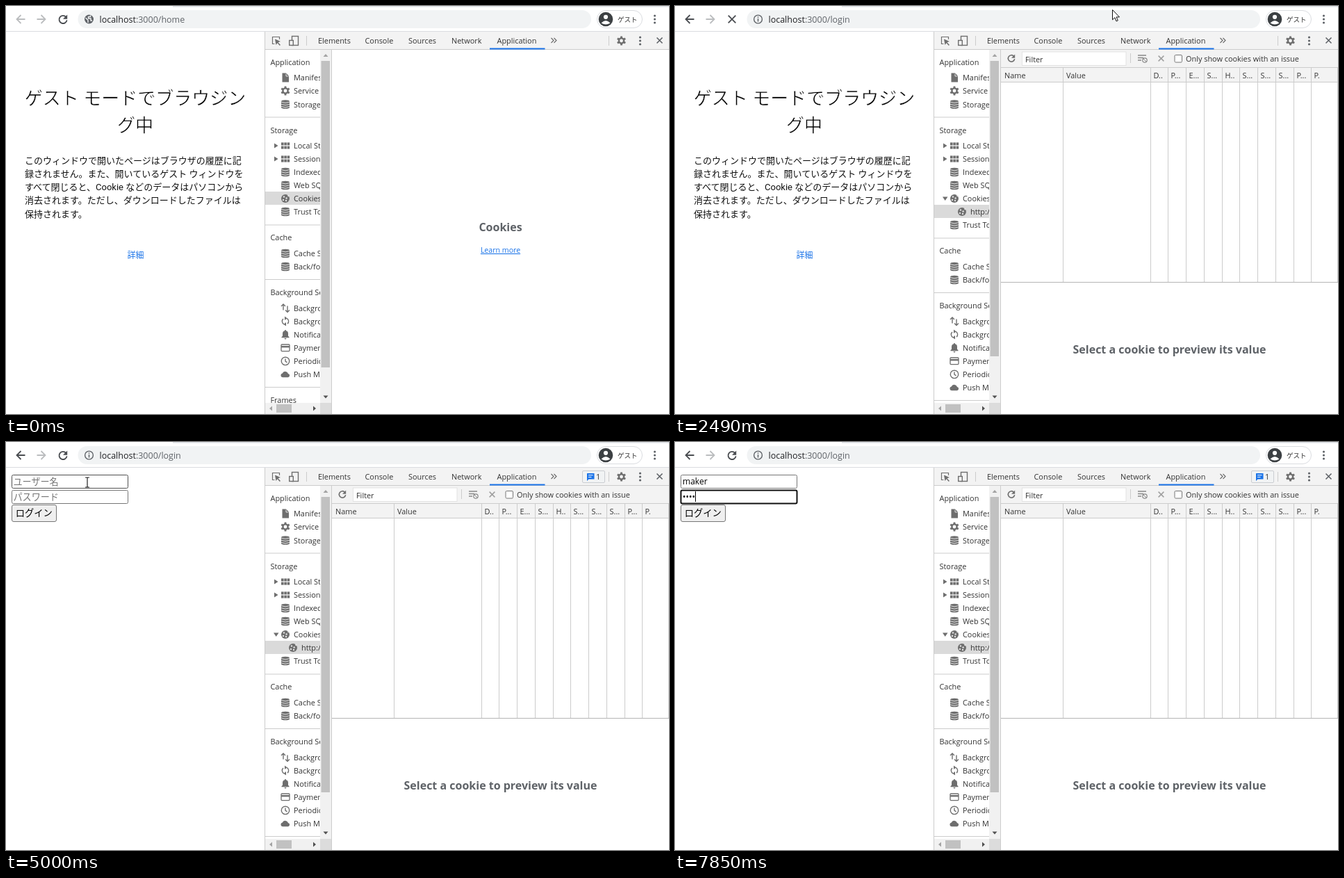
An HTML page for the animation above (8 s loop, 954x587 px).

```html
<!DOCTYPE html>
<html lang="ja">
<head>
<meta charset="utf-8">
<title>Login cookies</title>
<style>
html, body { margin: 0; width: 100%; height: 100%; overflow: hidden; background: #fff; }
svg { display: block; width: 954px; height: 587px; }
text { font-family: "Open Sans", "Noto Sans", "Noto Sans CJK JP", sans-serif; font-size: 10.9px; fill: #333; white-space: pre; }
.jp { font-family: Roboto, "Noto Sans CJK JP", "Noto Sans CJK", sans-serif; }
.title { font-size: 26px; font-weight: 300; fill: #000; stroke: #fff; stroke-width: .6; }
.body { font-size: 13px; fill: #111; }
.big { font-size: 16px; font-weight: 700; fill: #5f6368; }
.line { fill: none; stroke: #6e6e6e; stroke-width: 1.4; }
.rule { stroke: #ccc; stroke-width: 1; fill: none; }
</style>
</head>
<body>
<svg id="stage" viewBox="0 0 954 587" xmlns="http://www.w3.org/2000/svg"></svg>
<script>
const GREY = '#6e6e6e', DARK = '#5f6368', BLUE = '#1a73e8', PANEL = '#f3f3f3';

const text = (x, y, s, attrs = '') => `<text x="${x}" y="${y}" ${attrs}>${s}</text>`;
const rect = (x, y, w, h, fill, attrs = '') =>
  `<rect x="${x}" y="${y}" width="${w}" height="${h}" fill="${fill}" ${attrs}/>`;
const path = (d, attrs = 'class="line"') => `<path d="${d}" ${attrs}/>`;
const fill = c => `fill="${c}"`;
const stroke = (c, w = 1.5) => `fill="none" stroke="${c}" stroke-width="${w}"`;
const circle = (x, y, r, attrs) => `<circle cx="${x}" cy="${y}" r="${r}" ${attrs}/>`;
const group = (id, body, attrs = '') => `<g id="${id}" ${attrs}>${body}</g>`;
const at = (x, y, body) => `<g transform="translate(${x} ${y})">${body}</g>`;
const hline = (y, x1, x2, attrs = 'class="rule"') => path(`M${x1} ${y}H${x2}`, attrs);
const vline = (x, y1, y2, attrs = 'class="rule"') => path(`M${x} ${y1}V${y2}`, attrs);
const dots = (x, y) => [-5, 0, 5].map(d => circle(x, y + d, 1.6, fill(DARK))).join('');
const cross = (x, y, r, c, w) => at(x, y, path(`M${-r} ${-r}L${r} ${r}M${r} ${-r}L${-r} ${r}`, stroke(c, w)));
const reload = (x, y, r, c, w) => at(x, y,
  path(`M${r * .75} ${-r * .6}A${r} ${r} 0 1 0 ${r} ${r * .25}`, stroke(c, w)) +
  path(`M${r * 1.1} ${-r * 1.15}V${-r * .05}H0Z`, fill(c)));
const arrow = (x, dir, c) => at(x, 19,
  path(`M${6.5 * dir} 0H${-5.5 * dir}M${.5 * dir} -6L${-5.5 * dir} 0L${.5 * dir} 6`, stroke(c, 1.8)));

const icons = {
  file: path('M-4.5-6.5H1L5-2.5V6.5H-4.5Z', fill(GREY)) + path('M1-5.5V-2H4.5', stroke('#fff', .8)),
  gear: circle(0, 0, 3.6, stroke(GREY, 2.4)) +
    [0, 60, 120].map(a => path('M0-6.6V-4M0 4V6.6', `transform="rotate(${a})" ${stroke(GREY, 2.8)}`)).join(''),
  disks: path('M-6-4.2Q-6-6.3 0-6.3Q6-6.3 6-4.2V4.2Q6 6.3 0 6.3Q-6 6.3-6 4.2Z', fill(GREY)) +
    [-3.4, -.2, 3].map(y => path(`M-6 ${y}Q0 ${y + 2.6} 6 ${y}`, stroke('#fff', .8))).join(''),
  grid: [-6, -1.7, 2.6].map(x => rect(x, -4.6, 3.6, 4, GREY) + rect(x, .6, 3.6, 4, GREY)).join(''),
  cookie: circle(0, 0, 6, fill(GREY)) +
    [[-2, -2.5], [-3, 2], [1, 3], [1.6, -.5], [4.4, -4]].map(([x, y]) => circle(x, y, 1.2, fill('#e4e4e4'))).join(''),
  updown: path('M-3 3V-5M-6-2.5L-3-5.5L0-2.5M3-3V5.5M0 3L3 6L6 3'),
  sync: path('M-2 4.2A4.6 4.6 0 0 1-3-3.5M2-4.2A4.6 4.6 0 0 1 3 3.5') +
    path('M-1-7V-1.5L2.5-4.3ZM1 7V1.5L-2.5 4.3Z', fill(GREY)),
  bell: path('M-5.5 4.5V3.5L-4 2V-1.5Q-4-5-1-5.5V-6.5H1V-5.5Q4-5 4-1.5V2L5.5 3.5V4.5ZM-1.5 5.2H1.5Q1 6.8 0 6.8Q-1 6.8-1.5 5.2Z', fill(GREY)),
  card: rect(-6, -4.8, 12, 9.6, 'none', 'rx="1" stroke="#6e6e6e" stroke-width="1.3"') + rect(-6, -2.8, 12, 2.4, GREY),
  clock: circle(0, 0, 5.7, 'class="line"') + path('M0-3.5V.3L2.5 2'),
  cloud: path('M-4 4.3A3 3 0 0 1-4.3-1.6A4.4 4.4 0 0 1 3.9-1A2.7 2.7 0 0 1 4 4.3Z', fill(GREY)),
};
const icon = (name, x, y) => at(x, y, icons[name]);
const item = (y, name, label, dx = 0, c = '#333') => icon(name, 402 + dx, y) + text(414 + dx, y + 4, label, fill(c));
const heading = (y, label) => text(380.5, y + 4, label);
const items = rows => rows.map(r => item(...r)).join('');
const triangle = y => path(`M386 ${y - 3.5}L391.5 ${y}L386 ${y + 3.5}Z`, fill(GREY));

function browserBar() {
  return rect(0, 0, 954, 37, '#fff') + rect(240, 0, 714, 1.5, '#dee1e6') + hline(36.5, 0, 954, stroke('#dadce0', 1)) +
    group('backOff', arrow(21, 1, '#bbbdbf')) + group('backOn', arrow(21, 1, '#4a4d51')) + arrow(51, -1, '#bbbdbf') +
    group('reload', reload(82, 19, 5.6, '#4a4d51', 1.9)) + group('stop', cross(82, 19, 5.3, '#4a4d51', 1.8)) +
    group('pill', rect(103.5, 6, 738.5, 26, '#f1f3f4', 'rx="13"')) +
    group('pillFocus', rect(103, 6, 739, 26, '#fff', `rx="13" stroke="${BLUE}" stroke-width="2"`)) +
    group('globe', circle(119.5, 19, 6.5, fill(DARK)) +
      path('M114.5 17L118 20.5V24M121.5 13.5V15.5H118.5V18H122V21H124', stroke('#f1f3f4', 1.4))) +
    group('info', circle(119.5, 19, 5.9, stroke(DARK, 1.4)) + path('M119.5 18V22.5M119.5 15.3V16.8', stroke(DARK, 1.5))) +
    `<text id="url" x="134.5" y="23.5" style="font-size:12.5px"><tspan fill="#202124">localhost</tspan><tspan fill="#5f6368" id="urlPath"></tspan></text>` +
    group('urlCaret', rect(258, 10, 1, 17, '#000')) +
    rect(850.5, 6.5, 65, 25, '#fff', 'rx="12.5" stroke="#dadce0"') +
    circle(863, 19, 10.3, fill('#3c4043')) + circle(863, 15.8, 3.1, fill('#fff')) +
    path('M856.5 24.5Q863 17.5 869.5 24.5Q863 28.5 856.5 24.5Z', fill('#fff')) +
    text(880, 23, 'ゲスト', 'class="jp" style="font-size:9.5px"') + dots(933.5, 19);
}

function guestPage() {
  const lines = ['このウィンドウで開いたページはブラウザの履歴に記', '録されません。また、開いているゲスト ウィンドウを',
    'すべて閉じると、Cookie などのデータはパソコンから', '消去されます。ただし、ダウンロードしたファイルは', '保持されます。'];
  const title = 'class="jp title" text-anchor="middle"';
  return text(186, 141.5, 'ゲスト モードでブラウジン', title) + text(186, 180.5, 'グ中', title) +
    lines.map((s, i) => text(27, 226.5 + 19.3 * i, s, 'class="jp body"')).join('') +
    text(186.5, 362.5, '詳細', `class="jp" text-anchor="middle" style="font-size:12px;fill:${BLUE}"`);
}

function loginPage() {
  const field = (id, y, hint) =>
    `<rect id="${id}Box" x="8.5" y="${y}.5" width="167" height="19" rx="2" fill="#fff"/>` +
    text(10.5, y + 14.5, hint, `id="${id}Hint" class="jp" style="font-size:13.1px;fill:#757575"`) +
    text(11, y + 14, '', `id="${id}Text" style="font-size:12px;fill:#000"`) +
    rect(11, y + 2, 1, 15, '#000', `id="${id}Caret"`);
  return field('user', 47, 'ユーザー名') + field('pass', 69, 'パスワード') +
    rect(8.5, 90.5, 64, 24, '#efefef', 'rx="2.5" stroke="#767676"') +
    text(40.3, 107, 'ログイン', 'class="jp" text-anchor="middle" style="font-size:13.3px;fill:#000"');
}

function devtoolsBar() {
  const tabs = [['Elements', 449], ['Console', 516.5], ['Sources', 579], ['Network', 641], ['Application', 706.5]];
  return rect(373, 37, 581, 26, PANEL) + hline(62.5, 373, 954) +
    path('M393.5 48V44.5H383.5V54.5H386.5', stroke(GREY, 1.2)) + path('M387 47.5L395 51L391.5 52.2L395 56L393.8 57L390.5 53.2L388.5 56Z', fill(GREY)) +
    rect(411.5, 43.5, 9, 13, 'none', 'class="line"') + rect(407.7, 49.5, 5.6, 7, PANEL, 'stroke="#6e6e6e" stroke-width="1.4"') +
    vline(432.5, 43, 57) + tabs.map(([s, x]) => text(x, 54, s, fill('#444'))).join('') +
    rect(696, 60.5, 79.5, 2, BLUE) + path('M784.5 46L788 49.5L784.5 53M788.5 46L792 49.5L788.5 53', stroke(GREY, 1.2)) +
    group('badge', rect(829.5, 41.5, 32, 17, '#f1f3f4', 'rx="1.5" stroke="#cacdd1"') +
      path('M836 45H846.5V53.5H838.5L836 56Z', fill(BLUE)) + path('M838 47.7H844.5M838 50.5H842.5', stroke('#fff', 1)) + text(849, 54, '1')) +
    vline(867.5, 43, 57) + icon('gear', 885.5, 50) + dots(912.5, 50) + cross(940.5, 49.5, 4, DARK, 1.6);
}

function sidebar() {
  const ruleAt = y => hline(y, 373, 453);
  const top = heading(81, 'Application') + items([[103, 'file', 'Manifest'], [122, 'gear', 'Service Workers'], [141.5, 'disks', 'Storage']]) +
    ruleAt(160) + heading(178.5, 'Storage') + triangle(201) + triangle(220) +
    items([[201, 'grid', 'Local Storage'], [220, 'grid', 'Session Storage'], [239, 'disks', 'IndexedDB'], [258, 'disks', 'Web SQL']]);
  const tail = item(296, 'disks', 'Trust Tokens') + ruleAt(315) + heading(333, 'Cache') +
    items([[356, 'disks', 'Cache Storage'], [375, 'disks', 'Back/forward cache']]) + ruleAt(393.5) + heading(412, 'Background Services') +
    ['updown:Background Fetch', 'sync:Background Sync', 'bell:Notifications', 'card:Payment Handler', 'clock:Periodic Sync', 'cloud:Push Messaging']
      .map((s, i) => item(434.5 + 19.1 * i, ...s.split(':'))).join('') + ruleAt(548.5) + heading(567, 'Frames');
  return '<clipPath id="side"><path d="M373 63H452V571H373Z"/></clipPath>' +
    `<g clip-path="url(#side)">${top}` +
    group('cookieClosed', rect(373, 267, 80, 19, '#dadada') + item(277, 'cookie', 'Cookies', 0, '#5a5a5a')) +
    group('cookieOpen', rect(373, 286, 80, 19, '#dadada') + item(277, 'cookie', 'Cookies') +
      path('M385 274.5H392.5L388.7 280Z', fill(GREY)) + item(296, 'cookie', 'http://localhost:3000', 11, '#5a5a5a')) +
    group('tail', tail) + '</g>' +
    rect(452, 63, 16, 508, '#f1f1f1') + rect(453.5, 79, 12.5, 441, '#c1c1c1', 'id="thumb"') +
    rect(373, 571, 79, 16, '#f1f1f1') + rect(389, 573, 22, 12, '#c1c1c1') + rect(452, 571, 16, 16, '#dcdcdc') +
    path('M456.5 73L460 69L463.5 73ZM383 575.5L379 579L383 582.5Z', fill('#a3a3a3')) +
    path('M456.5 560.5H463.5L460 564.5ZM442 575.5L446 579L442 582.5Z', fill('#505050')) +
    vline(468.5, 63, 587) + vline(372.5, 37, 587);
}

const bigText = (y, s) => text(711.5, y, s, 'class="big" text-anchor="middle"');
const emptyPanel = () => bigText(323.5, 'Cookies') +
  text(711.5, 355, 'Learn more', `text-anchor="middle" text-decoration="underline" style="font-size:10.6px;fill:${BLUE}"`);

function cookiePanel() {
  const column = i => Math.round(683.5 + 25.75 * i);
  const labels = ['D..', 'P...', 'E...', 'S...', 'H..', 'S...', 'S...', 'S...', 'P...', 'P.'];
  return rect(469, 63, 485, 46, PANEL) + hline(88.5, 469, 954) + hline(109.5, 469, 954) +
    reload(484, 75, 4.7, GREY, 1.6) + rect(499.5, 66, 149.5, 19.5, '#fff', 'stroke="#e3e3e3"') +
    text(504, 80.5, 'Filter') + vline(655.5, 68, 82) +
    path('M666 71H678M666 74.5H674M666 78H671', stroke('#888', 1.3)) +
    circle(676, 78, 3.2, stroke('#888', 1.2)) + path('M674 76L678 80', stroke('#888', 1)) +
    cross(699.5, 75.5, 3.9, '#a0a0a0', 1.5) + rect(719, 70.5, 10.5, 10.5, '#fff', 'rx="1.5" stroke="#767676"') +
    text(735, 80, 'Only show cookies with an issue') +
    text(474, 103.5, 'Name') + text(563, 103.5, 'Value') + vline(558.5, 89, 397) + vline(953.5, 89, 397) +
    labels.map((s, i) => vline(column(i) + .5, 89, 397) + text(column(i) + 4.5, 103.5, s)).join('') +
    hline(397.5, 469, 954, stroke('#b5b5b5', 1)) + bigText(499.5, 'Select a cookie to preview its value');
}

const stage = document.getElementById('stage');
stage.innerHTML = rect(0, 0, 954, 587, '#fff') + group('guest', guestPage()) + group('login', loginPage()) +
  devtoolsBar() + sidebar() + group('empty', emptyPanel()) + group('table', cookiePanel()) + browserBar() +
  group('halo', circle(551.5, 24.5, 11.5, fill('#f5e42f') + ' opacity=".8"')) +
  group('beam', path('M-3-7H-.8L0-6.3L.8-7H3M0-6.3V6.3M-3 7H-.8L0 6.3L.8 7H3', stroke('#222', 1.2))) +
  group('pointer', path('M.5.5V14.8L3.9 11.7L6 16.9L8.3 15.9L6.1 10.9H10.5Z', 'fill="#fff" stroke="#111"'));

const $ = id => document.getElementById(id);
const show = (id, on) => $(id).setAttribute('display', on ? 'inline' : 'none');
const set = (id, name, value) => $(id).setAttribute(name, value);

// Each entry: start time, then values held until the next entry.
const hold = (track, t) => track.reduce((now, step) => t >= step[0] ? step : now);
const cursorTrack = [
  [0], [660, 'beam', 549, 24], [830, 'beam', 553, 25], [990, 'beam', 570, 22], [1160, 'beam', 605, 14],
  [1320, 'pointer', 629, 5], [3150, 'pointer', 601, 5], [3480, 'pointer', 594, 3], [3650, 'pointer', 570, 1],
  [3820, 'pointer', 512, 0], [3990, 'pointer', 440, 2], [4160, 'beam', 365, 13], [4330, 'beam', 295, 15],
  [4500, 'beam', 240, 16], [4670, 'beam', 190, 25], [4830, 'pointer', 145, 42], [5000, 'beam', 117, 58], [5670],
];
const userTrack = [[0, 0], [6500, 1], [6670, 3], [6850, 5]];
const passTrack = [[0, 0], [7510, 1], [7670, 3], [7850, 4]];

function drawField(id, value, focused, hover, caret) {
  $(id + 'Text').textContent = value;
  show(id + 'Hint', !value);
  set(id + 'Box', 'stroke', focused ? '#101010' : hover ? '#4f4f4f' : '#767676');
  set(id + 'Box', 'stroke-width', focused ? 2 : 1);
  show(id + 'Caret', caret);
  set(id + 'Caret', 'x', Math.round(11 + (value ? $(id + 'Text').getComputedTextLength() : 0)));
}

function draw(t) {
  const between = (a, b) => t >= a && t < b;
  const focused = between(830, 2320), committed = t >= 2490, painted = t >= 2820;
  const toggles = {
    pill: !focused, pillFocus: focused, urlCaret: focused && !between(1320, 1820),
    globe: t < 2320, info: t >= 2320, stop: between(2320, 2820), reload: !between(2320, 2820),
    backOff: !committed, backOn: committed, empty: !committed, table: committed,
    cookieClosed: !committed, cookieOpen: committed, guest: !painted, login: painted, badge: painted,
    halo: between(830, 990),
  };
  for (const id in toggles) show(id, toggles[id]);
  $('urlPath').textContent = ':3000/' + (committed ? 'login' : 'home');
  set('tail', 'transform', `translate(0 ${committed ? 19 : 0})`);
  set('thumb', 'height', committed ? 425 : 441);

  const [, shape, x, y] = hold(cursorTrack, t);
  for (const id of ['beam', 'pointer']) {
    show(id, id === shape);
    if (id === shape) set(id, 'transform', `translate(${x} ${y})`);
  }

  drawField('user', 'maker'.slice(0, hold(userTrack, t)[1]), between(5520, 7180), between(5000, 5520),
    between(5520, 6000) || between(6500, 7180));
  drawField('pass', '•'.repeat(hold(passTrack, t)[1]), t >= 7180, false, t >= 7180);
}

const start = performance.now();
function tick() {
  draw((performance.now() - start) % 8000);
  requestAnimationFrame(tick);
}
tick();
</script>
</body>
</html>
```
